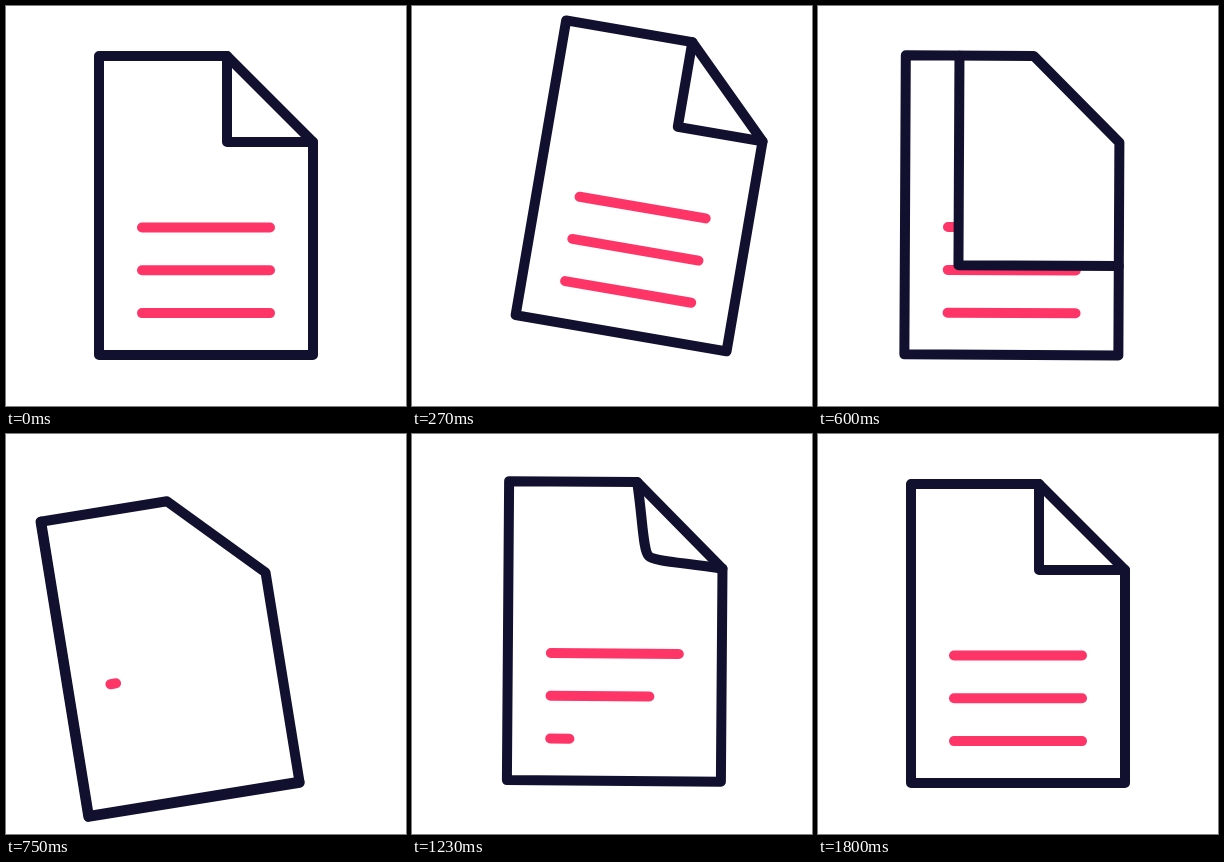
Recreate the animation shown at these times as an HTML page. Size 400 by 400 pixels, loop 1.89 s.

```html
<!DOCTYPE html>
<html lang="en">
<head>
<meta charset="utf-8">
<title>Document</title>
<style>
  html, body { margin: 0; width: 100%; height: 100%; overflow: hidden; background: #fff; }
  svg { display: block; width: 100%; height: 100%; }
  path { fill: none; stroke: #11112f; stroke-width: 10; stroke-linecap: round; stroke-linejoin: round; }
  #lines path { stroke: #ff3568; }
  #flap { fill: #fff; stroke: none; }
</style>
</head>
<body>
<svg viewBox="0 0 400 400">
  <g id="page">
    <g id="oldLines"></g>
    <path id="flap"/>
    <path id="fold"/>
    <path d="M93 50H221L307 136V349H93Z"/>
    <g id="lines"><path/><path/><path/></g>
  </g>
</svg>
<script>
const LOOP = 1890, STEP = 30;
const LEFT = 93, TOP = 50, RIGHT = 307, BOTTOM = 349;
const CUT_X = 221, CUT_Y = 136;

// Each track is a list of [time, value], eased between neighbours.
const TURN = [[0, 0], [310, 10.2], [400, 10.2], [810, -10.4], [885, -10.4], [1425, 5], [1795, 0]];
const SHIFT_X = [[0, 0], [345, 39], [370, 39], [780, -37], [905, -37], [1365, 13.5], [1395, 13.5], [1750, 0]];
const SHIFT_Y = [[0, 0], [330, -21.5], [395, -21.5], [800, 20.5], [905, 20.5], [1365, -8], [1395, -8], [1750, 0]];
const SWEEP = [[395, 0], [765, 1]];
const CURL = [[850, 0], [1435, 1]];
const WRITE = [[[690, 0], [1160, 1]], [[857, 0], [1397, 1]], [[1098, 0], [1638, 1]]];

const page = document.getElementById("page");
const flap = document.getElementById("flap");
const fold = document.getElementById("fold");
const lines = [...document.querySelectorAll("#lines path")];
const oldLines = lines.map(line => {
  const copy = line.cloneNode();
  copy.style.stroke = "#ff3568";
  return document.getElementById("oldLines").appendChild(copy);
});

function valueAt(track, t) {
  if (t <= track[0][0]) return track[0][1];
  for (let i = 1; i < track.length; i++) {
    const [t0, a] = track[i - 1], [t1, b] = track[i];
    if (t < t1) {
      const u = (t - t0) / (t1 - t0);
      return a + (b - a) * u * u * (3 - 2 * u);
    }
  }
  return track[track.length - 1][1];
}

function drawLine(line, row, amount) {
  const y = 221.5 + row * 42.8;
  line.setAttribute("d", amount > 0.002 ? `M136 ${y}H${136 + 128 * amount}` : "");
}

// The folded corner is pulled across the whole sheet.
function drawSweep(p) {
  const x = CUT_X + (LEFT - CUT_X) * p;
  const y = CUT_Y + (BOTTOM - CUT_Y) * p;
  const edge = `M${x} ${TOP}V${y}H${RIGHT}`;
  fold.setAttribute("d", edge);
  flap.setAttribute("d", `${edge}V${CUT_Y}L${CUT_X} ${TOP}Z`);
}

// A new corner bends out of the diagonal and sharpens.
function drawCurl(p) {
  const mx = 264 - 43 * p, my = 93 + 43 * p;
  const soft = 21 * (1 - p), reach = soft + 43 * p;
  fold.setAttribute("d",
    `M${CUT_X} ${TOP}C${CUT_X + soft} ${TOP + reach} ${mx - soft} ${my - soft} ${mx} ${my}` +
    `C${mx + soft} ${my + soft} ${RIGHT - reach} ${CUT_Y - soft} ${RIGHT} ${CUT_Y}`);
  flap.setAttribute("d", "");
}

function draw(t) {
  const x = 200 + valueAt(SHIFT_X, t), y = 200 + valueAt(SHIFT_Y, t);
  page.setAttribute("transform", `translate(${x} ${y}) rotate(${valueAt(TURN, t)}) translate(-200 -200)`);
  const sweep = valueAt(SWEEP, t);
  if (sweep < 1) drawSweep(sweep);
  else drawCurl(valueAt(CURL, t));
  lines.forEach((line, i) => {
    drawLine(line, i, valueAt(WRITE[i], t));
    drawLine(oldLines[i], i, sweep < 1 ? 1 : 0);
  });
}

const start = performance.now();
function tick() {
  const t = (performance.now() - start) % LOOP;
  draw(Math.floor(t / STEP) * STEP);
  requestAnimationFrame(tick);
}
tick();
</script>
</body>
</html>
```
